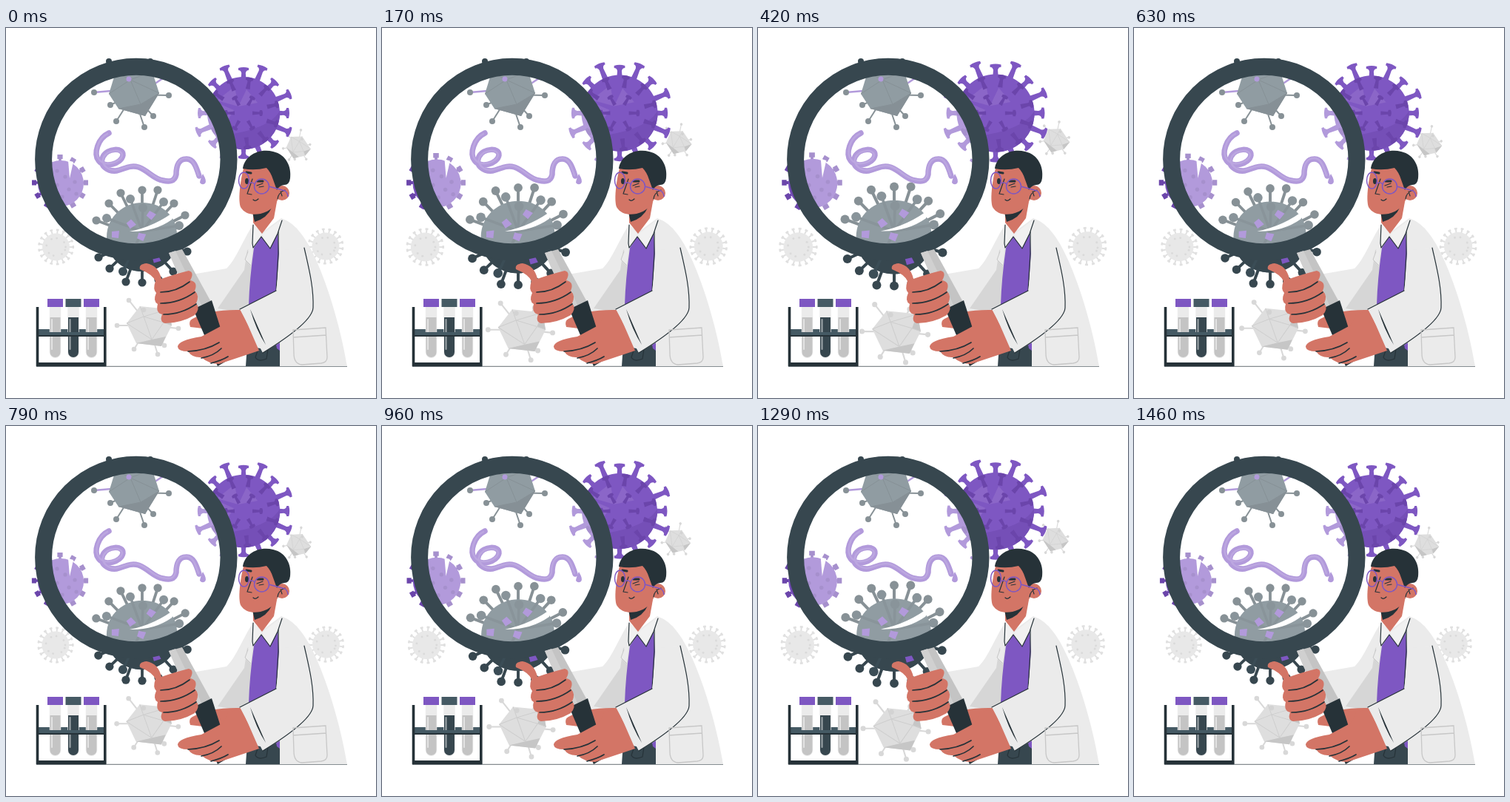
An HTML page that plays this animation: 500 by 500 pixels, repeating every 1.5 s.

```html
<!DOCTYPE html>
<html lang="en">
<head>
<meta charset="utf-8">
<title>Virus research</title>
<style>
html, body { margin: 0; height: 100%; overflow: hidden; background: #fff; }
svg { display: block; width: 100vw; height: 100vh; }
.skin { fill: #d37566; }
.ink { fill: none; stroke: #263238; stroke-width: 1.2; stroke-linecap: round; stroke-linejoin: round; }
.ink.bold { stroke-width: 1.7; }
</style>
</head>
<body>
<svg viewBox="0 0 500 500">
  <g id="viruses"></g>

  <g id="squiggle" fill="none" stroke-linecap="round">
    <path stroke="#7e57c2" stroke-width="7.5" d="M139 142C124 149 118 170 125 179C133 190 156 184 158 172C159 161 137 162 131 174C125 187 139 194 149 193C161 190 168 185 179 188C193 193 199 204 212 206C220 208 228 208 230 198C230 184 235 177 243 177C253 176 257 187 261 200"/>
    <path stroke="#8f6ccb" stroke-width="2.500" d="M137 143C123 150 119 170 126 178C134 188 155 182 157 172C157 163 138 164 132 174C127 186 140 193 149 192C161 189 168 184 179 187C193 192 199 203 212 205C220 207 227 207 229 198C229 183 235 176 243 176C252 175 256 187 260 199"/>
    <path fill="#7e57c2" d="M266 197Q272 207 269 210Q265 213 262 209Q262 206 266 197Z"/>
  </g>

  <circle cx="176" cy="177.5" r="120" fill="#fff" opacity=".4"/>
  <circle cx="175.800" cy="177.5" r="125.2" fill="none" stroke="#37474f" stroke-width="23"/>

  <path stroke="#263238" stroke-width=".7" d="M41 457.3H461"/>
  <g id="rack"></g>

  <g id="coat">
    <path fill="#ebebeb" d="M334 266C320 286 311 313 298 325L240 335L258 385L326 384L324 457H461C452 400 425 310 398 277Q388 263 372 257L346 276Z"/>
    <path fill="#d6d6d6" d="M326 300L322 327L286 379L319 384L329 374L334 297Z"/>
    <path fill="#ebebeb" d="M333 267L327 302L323 313L331 322L334 296Z"/>
    <path fill="none" stroke="#c7c7c7" d="M327 302L323 313L331 321"/>
    <path fill="#37474f" d="M324 457L326 430L350 434L370 424V457Z"/>
    <path fill="#7e57c2" d="M365 428L370 425V436L366 433ZM335 297L345 282L357 298L367 273L369 305L365 356L328 374Q329 340 335 297Z"/>
    <path class="ink" d="M340 436L337 445Q341 452 352 447L354 434M368 272L368 305L365 355"/>
  </g>

  <g id="head">
    <path class="skin" d="M334 245L366 235L362 257L346 278L334 263Z"/>
    <path fill="#263238" d="M333 249Q348 252 359 243Q353 257 336 262Z"/>
    <path fill="#f1f1f1" d="M334 265L346 279L334 297L332 283ZM346 279L373 258L371 270L357 298Z"/>
    <path class="ink" d="M334 266L333 291L334 297L345 282L357 298L367 278L373 260"/>
    <circle class="skin" cx="373" cy="223" r="10"/>
    <path class="skin" d="M322 186C317 203 313 232 317 242C323 252 334 253 344 251C357 248 366 239 368 229L371 200L345 180Z"/>
    <path fill="#263238" d="M320 190C322 174 340 162 361 167C379 171 386 188 384 203Q383 212 376 212Q369 213 366 219L361 205Q358 195 352 189Q336 193 320 190Z"/>
    <path class="ink" d="M333 204L326 224L332 225M334 232Q337 235 341 231M339 213L347 210M342 215L348 214M367 231Q368 222 377 219M371 221L373 227"/>
    <path class="ink" style="stroke-width:3" d="M325 195L331 196M340 207L347 207"/>
    <ellipse cx="325.5" cy="207" rx="2.5" ry="4" fill="#263238"/>
    <g fill="none" stroke="#7e57c2" stroke-width="1.5">
      <ellipse cx="321.5" cy="206" rx="7" ry="11"/>
      <circle cx="345.500" cy="214" r="10"/>
      <path d="M329 210Q332 207 336 211M355 214L377 220Q381 223 381 228"/>
    </g>
  </g>

  <g id="hands">
    <path class="skin" d="M249 404Q246 396 252 393Q274 380 318 381L300 410Z"/>
    <path fill="#c4c4c4" d="M220 304L238 299L277 370L254 381Z"/>
    <path fill="#d0d0d0" d="M220 304L229 301L265 376L254 381Z"/>
    <path fill="#263238" d="M253 380L278 368L303 447L286 457Z"/>
    <path class="skin" d="M181 326Q179 319 190 318Q206 321 210 339Q230 332 247 328Q255 330 249 341Q260 343 255 355Q262 362 257 372Q263 379 255 388Q236 399 215 399Q207 397 211 387Q202 385 205 373Q198 369 203 358Q198 353 202 342Q198 333 181 326Z"/>
    <path class="ink bold" d="M209 357Q230 357 248 343M209 372Q234 372 255 357M213 387Q237 387 257 373"/>
    <path class="skin" d="M318 381L300 387L294 401L264 417Q232 422 232 431Q233 437 246 437Q252 446 264 445Q274 454 288 454L342 436Z"/>
    <path class="ink bold" d="M246 437Q270 436 288 425M264 446Q281 443 291 433M277 453Q292 449 300 444"/>
  </g>

  <g id="sleeve">
    <path fill="#ebebeb" d="M372 300L365 355L316 380L347 439L412 400Q419 375 403 297Z"/>
    <path class="ink" d="M365 355L316 380M403 297C409 324 416 350 415 378Q414 398 347 439"/>
    <path fill="#263238" d="M330 380L351 428Q338 408 330 380Z"/>
    <path fill="none" stroke="#c7c7c7" stroke-width="1.3" d="M388 408L432 405L434 445Q434 452 426 453L400 455Q389 454 389 440ZM388 418L433 415"/>
  </g>
</svg>

<script>
const PURPLE = '#7e57c2', DEEP = '#6b45ab', SLATE = '#37474f';
const range = n => [...Array(n).keys()];
const at = (x, y, body, rot = 0, k = 1) =>
  `<g transform="translate(${x} ${y}) rotate(${rot}) scale(${k})">${body}</g>`;
const shape = (d, fill, extra = '') => `<path d="${d}" fill="${fill}" ${extra}/>`;
const circle = (x, y, r, fill) => `<circle cx="${x}" cy="${y}" r="${r}" fill="${fill}"/>`;
const ring = (n, start, body) =>
  range(n).map(i => at(0, 0, body, start + i * 360 / n)).join('');
const knobs = (points, r, fill, width, hub = [0, 0]) => points.map(([x, y]) =>
  `<path d="M${hub}L${x} ${y}" stroke="${fill}" stroke-width="${width}"/>` + circle(x, y, r, fill)).join('');

// Spikes point along +x: a trumpet flares at radius r, a stud ends in a square cap.
const trumpet = (from, r, w, fill) => shape(
  `M${from} ${-w * .6}L${r - w} ${-w * .4}Q${r - 3} ${-w * .5} ${r - 3} ${-w}L${r} ${-w}Q${r + 2} 0 ${r} ${w}L${r - 3} ${w}Q${r - 3} ${w * .5} ${r - w} ${w * .4}L${from} ${w * .6}Z`, fill);
const stud = (from, r, w, cap, fill) =>
  shape(`M${from} ${-w / 2}H${r - cap}V${-w}H${r}V${w}H${r - cap}V${w / 2}H${from}Z`, fill);

const bigPurple = () => at(321, 115,
  ring(8, -90, trumpet(38, 61, 7, PURPLE)) +
  ring(8, -67.5, trumpet(38, 68, 7, PURPLE)) +
  circle(0, 0, 49, PURPLE) +
  shape('M-38 31A49 49 0 0 0 49 -3Q34 24 -38 31Z', '#754fb7') +
  shape('M-36 -17L-12 -36L-7 -9ZM-7 -9L4 -32L19 -14ZM-36 -14L-13 -4L-25 16Z', '#8b66c8') +
  ring(11, -80, trumpet(33, 48, 5, DEEP)) +
  ring(6, -60, trumpet(12, 25, 4, DEEP)));

const smallSpiky = (x, y, rot) => at(x, y,
  ring(17, 0, stud(14, 24.5, 1.9, 2.5, '#e0e0e0')) +
  circle(0, 0, 18.5, '#e8e8e8') +
  range(9).map(i => circle(13 * Math.cos(i * 2.4), 12 * Math.sin(i * 2.4), 1.4, '#dadada')).join(''), rot);

const paleFacets = (x, y, rot, k) => at(x, y,
  knobs([[-27, -34], [-43, 0], [-20, 32], [12, 39], [21, 27], [40, 4], [17, -28]], 3.3, '#d8d8d8', 2) +
  shape('M-30 -3L-12 -26L27 -22L31 0L17 28L-17 24Z', '#dedede') +
  shape('M-17 24L17 28L23 15L4 19ZM27 -22L31 0L20 -4Z', '#c6c6c6') +
  shape('M-30 -3L-7 -12L27 -22M-12 -26L-7 -12L4 19M-7 -12L20 -4L4 19L-30 -3M20 -4L31 0', 'none', 'stroke="#cecece"') +
  circle(-7, -21, 3.3, '#d3d3d3'), rot, k);

const darkFacets = () => at(172, 90,
  knobs([[-31, 14], [-23, 36], [15, 44], [27, 29], [48, 1], [-33, -45], [23, -45]], 4, SLATE, 2) +
  shape('M-53 -3L-30 -5M28 -14L43 -24', 'none', `stroke="${PURPLE}" stroke-width="2.5"`) +
  circle(-53, -3, 4, SLATE) +
  shape('M-33 -1L-24 -30L26 -30L35 -2L16 29L-20 19Z', '#455a64') +
  shape('M-20 19L10 13L35 -2L16 29Z', '#36464f') +
  shape('M-33 -1L-4 -20L10 13L-20 19M-4 -20L35 -2L10 13L16 29M-4 -20L-24 -30M-4 -20L22 -30', 'none', 'stroke="#36464f"') +
  circle(-6, -21, 3.5, PURPLE));

const darkRound = () => at(184, 283,
  knobs([[-29, -60], [0, -64], [21, -64], [43, -46], [58, -30], [-62, -23], [-45, -46],
    [61, 19], [-59, 27], [-44, 42], [-22, 60], [0, 61], [22, 57], [42, 46]], 5.6, SLATE, 3.8) +
  shape('M-48 0C-48 -30 -23 -47 0 -47C24 -47 40 -33 46 -15L48 5C45 30 23 46 0 46C-27 46 -48 26 -48 0Z', '#455a64') +
  shape('M-47 8Q0 38 48 5C45 30 23 46 0 46C-25 46 -44 30 -47 8Z', SLATE) +
  knobs([[-48, -26], [-16, -52], [29, -48], [50, -16], [-26, 46], [1, -40]], 6, '#3b4d56', 3.5, [0, -8]) +
  [[-36, -4], [-1, -1], [12, -30], [-15, -18], [19, 29]].map(([x, y], i) =>
    at(x, y, shape('M-5 -4L5 -5L4 5L-5 4Z', PURPLE), i * 17)).join('') +
  shape('M-17 -8Q18 -15 46 -37L40 -24Q16 -7 -17 -8Z', '#fff'));

const leftPurple = () => at(73, 209,
  ring(12, -90, stud(26, 38, 3.6, 6, DEEP)) +
  circle(1, 1, 31, PURPLE) +
  shape('M-20 -20A31 31 0 0 0 -2 32Q-20 8 -20 -20Z', DEEP) +
  [[-4, -16], [7, -8], [-4, 3], [12, 9], [20, -1], [3, 19], [-12, -7], [22, 15]]
    .map(([x, y]) => circle(x, y, 2.6, DEEP)).join('') +
  shape('M11 -30L13 -6L18 -28Z', '#fff'));

const layers = [
  { origin: [250, 295.5], body: smallSpiky(67.5, 296, 0) + smallSpiky(432, 295, 8) },
  { origin: [281, 290], body: paleFacets(193, 402, 0, 1) + paleFacets(394, 160, 50, .52) },
  { origin: [321, 115], body: bigPurple() },
  { origin: [73, 209], body: leftPurple() },
  { origin: [183.5, 282], body: darkRound() }
];
const viruses = document.getElementById('viruses');
viruses.innerHTML = layers.map(l => `<g class="pulse">${l.body}</g>`).join('') + darkFacets();
const pulsing = [...viruses.querySelectorAll('.pulse')];

const box = (x, y, w, h, fill, rx = 0) =>
  `<rect x="${x}" y="${y}" width="${w}" height="${h}" rx="${rx}" fill="${fill}"/>`;
const tube = (x, cap, liquid) =>
  box(x + 2.8, 370, 15.4, 76, '#ebebeb', 7.7) +
  shape(`M${x + 3.5} 391H${x + 17.5}V438A7 7 0 0 1 ${x + 3.5} 438Z`, liquid) +
  box(x + 5, 393, 2, 42, '#fff8', 1) + box(x, 366, 21, 11, cap);
document.getElementById('rack').innerHTML =
  box(41, 407, 94, 10, '#455a64') +
  tube(56, PURPLE, '#c4c4c4') + tube(80.5, '#455a64', SLATE) + tube(105, PURPLE, '#c4c4c4') +
  box(43, 411, 91, 4, '#455a64') + box(43, 415, 91, 2, '#263238') +
  box(40.7, 377, 3.6, 80, '#263238') + box(132, 377, 3.6, 80, '#263238') + box(41, 452, 94, 5.3, '#263238');

// Two linear beats per loop: [ms, amount].
const beats = [[-20, 0], [305, 1], [790, .09], [1200, 1], [1480, 0], [1805, 1]];
function beat(t) {
  const i = beats.findIndex(([end]) => t < end);
  const [t0, v0] = beats[i - 1], [t1, v1] = beats[i];
  return v0 + (v1 - v0) * (t - t0) / (t1 - t0);
}

function draw(now) {
  const step = Math.floor((now % 1500 + 5) * .024) % 36;
  const k = (1 + .1 * beat(step * 1000 / 24)) / 1.0064;
  pulsing.forEach((g, i) => {
    const [x, y] = layers[i].origin;
    g.setAttribute('transform', `translate(${x} ${y}) scale(${k}) translate(${-x} ${-y})`);
  });
  requestAnimationFrame(draw);
}
draw(performance.now());
</script>
</body>
</html>
```
